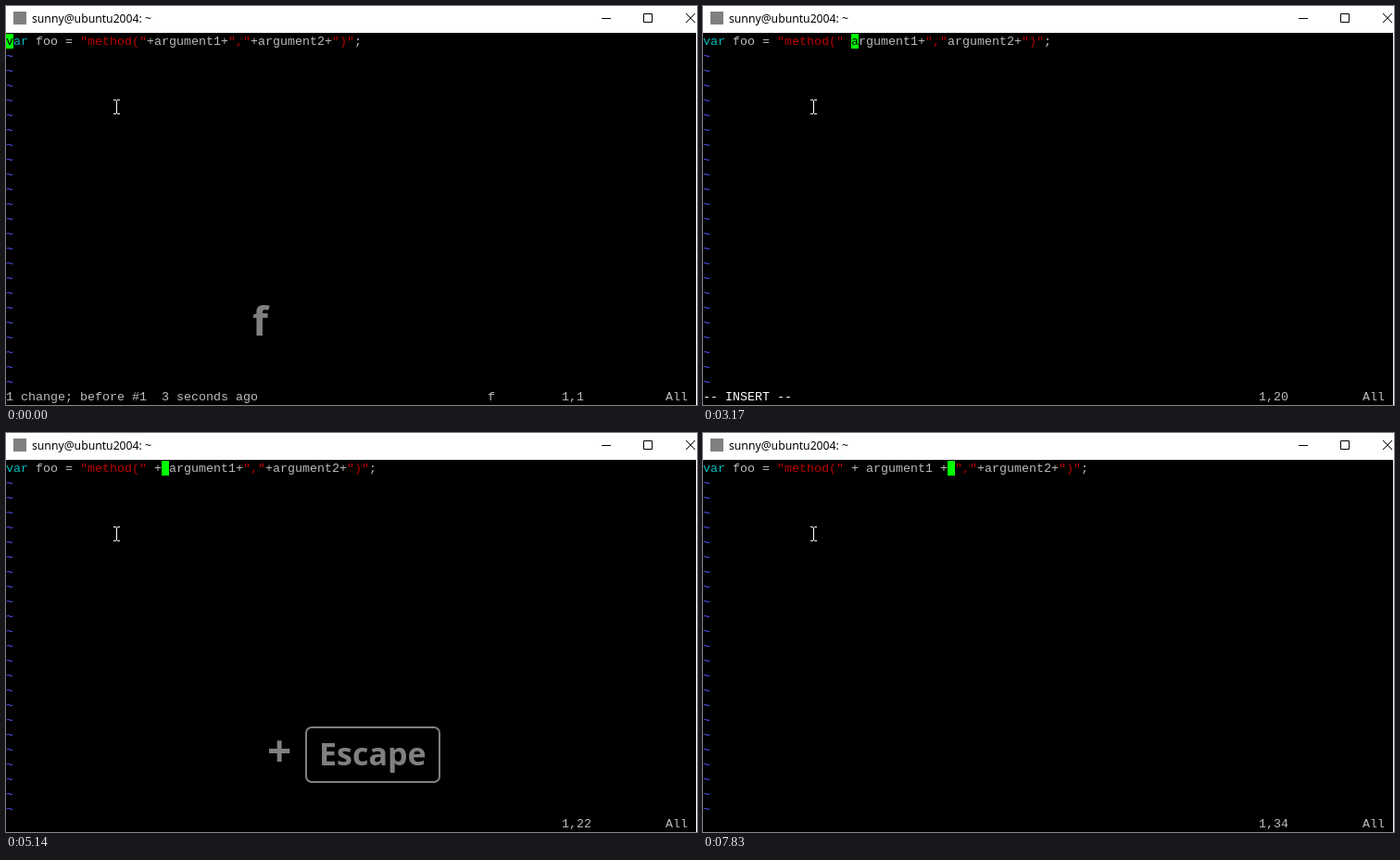
Animation of 746x431 px, one loop 8 s. Source, as an HTML page:

```html
<!DOCTYPE html>
<html lang="en">
<head>
<meta charset="utf-8">
<title>Terminal</title>
<style>
  html, body { margin: 0; width: 100%; height: 100%; overflow: hidden; background: #000; }
  svg { display: block; width: 746px; height: 431px; }
  text { white-space: pre; }
  .mono { font: 13.333px "Liberation Mono", "Courier New", monospace; }
  .title { font: 12.2px "Noto Sans", "Open Sans", sans-serif; }
  .key { font-family: "Open Sans", "Noto Sans", sans-serif; font-weight: 700; fill: #808080; }
</style>
</head>
<body>
<svg viewBox="0 0 746 431">
  <rect width="746" height="431"/>
  <rect width="746" height="29" fill="#fff"/>
  <rect x="745" width="1" height="431" fill="#fff"/>
  <rect x="8" y="6" width="14" height="14" fill="#808080"/>
  <text class="title" x="28" y="18">sunny@ubuntu2004: ~</text>
  <g fill="none" stroke="#000" stroke-linejoin="round">
    <path d="M643 13.5h10M688.5 8.5h9v9h-9z"/>
    <path d="M734 8l10 10M744 8l-10 10"/>
  </g>
  <g id="tildes"></g>
  <g id="screen"></g>
  <path d="M116 101.5h3M120 101.5h3M119.5 102v14M116 116.5h3M120 116.5h3" fill="none" stroke="#fff"/>
  <g id="keys"></g>
</svg>
<script>
const LOOP = 8000, CELL = 8, ROW = 16, TOP = 30;
const $ = id => document.getElementById(id);

function add(parent, tag, attrs, content = "") {
  const el = document.createElementNS("http://www.w3.org/2000/svg", tag);
  for (const name in attrs) el.setAttribute(name, attrs[name]);
  el.textContent = content;
  parent.append(el);
}

const put = (parent, col, row, str, fill = "#bbb") =>
  add(parent, "text", { class: "mono", x: col * CELL, y: TOP + row * ROW + 12, fill }, str);

for (let row = 1; row <= 23; row++) put($("tildes"), 0, row, "~", "#5555ff");

// Pressed keys: [text, x, baseline, size]
const F = ["f", 266, 356, 43.5];
const plus = x => ["+", x, 359.5, 46];
const ESC = ["Escape", 338, 359, 34];
const SEMI = [";", 473, 356, 43];

const code = (before, after = '","+argument2+")";') =>
  `var foo = "method("${before}${after}`;
const INSERT = "-- INSERT --";

// Each step lists only what differs from the step before it.
const steps = [
  [0, { line: code("+argument1+"), col: 0, ruler: "1,1", pending: "f",
        msg: "1 change; before #1  3 seconds ago", keys: [F], alpha: 1 }],
  [250, { alpha: .5 }],
  [370, { alpha: 0 }],
  [520, { col: 19, ruler: "1,20", pending: "", keys: [F, plus(286)], alpha: 1 }],
  [950, { alpha: .5 }],
  [1070, { alpha: 0 }],
  [1940, { line: code("argument1+"), msg: INSERT, keys: [["s", 266, 356, 43]], alpha: 1 }],
  [2470, { alpha: .5 }],
  [2590, { alpha: 0 }],
  [3170, { line: code(" argument1+", '","argument2+")";'), col: 20 }],
  [3290, { line: code(" argument1+"), ruler: "1,21" }],
  [3700, { line: code(" +argument1+"), col: 21, ruler: "1,22", keys: [plus(282)], alpha: 1 }],
  [4100, { line: code(" + argument1+"), col: 22, ruler: "1,23" }],
  [4600, { alpha: .5 }],
  [4720, { alpha: 0 }],
  [4870, { keys: [plus(282), ESC], alpha: 1 }],
  [4990, { msg: "", ruler: "" }],
  [5140, { col: 21, ruler: "1,22" }],
  [5420, { alpha: .5 }],
  [5570, { alpha: 0 }],
  [5850, { col: 31, ruler: "1,32", keys: [plus(282), ESC, SEMI], alpha: 1 }],
  [6410, { alpha: 0 }],
  [7250, { line: code(" + argument1 + "), col: 33, ruler: "1,34", keys: [[".", 265.5, 356, 43]], alpha: 1 }],
  [7680, { alpha: .5 }],
  [7830, { alpha: 0 }]
];

let last = {};
const states = steps.map(([at, change]) => last = { ...last, ...change, at });

const tokenColor = token =>
  token[0] === '"' ? "#bb0000" : token === "var" ? "#00bbbb" : "#bbb";

function drawLine(g, { line, col }) {
  for (const { 0: token, index } of line.matchAll(/"[^"]*"|[^"\s]+/g))
    put(g, index, 0, token, tokenColor(token));
  add(g, "rect", { x: col * CELL, y: TOP, width: CELL, height: ROW, fill: "#0f0" });
  put(g, col, 0, line[col], "#000");
}

function drawStatus(g, { msg, ruler, pending }) {
  put(g, 0, 24, msg, msg === INSERT ? "#fff" : "#bbb");
  put(g, 65, 24, pending);
  put(g, 75, 24, ruler);
  if (ruler) put(g, 89, 24, "All");
}

function drawKeys(g, { keys, alpha }) {
  g.setAttribute("opacity", alpha);
  for (const key of keys) {
    const [str, x, y, size] = key;
    if (key === ESC) add(g, "rect", { x: 324, y: 318, width: 144, height: 59, rx: 6,
      fill: "none", stroke: "#808080", "stroke-width": 2 });
    add(g, "text", { class: "key", x, y, "font-size": size }, str);
  }
}

let shown;
function render(t) {
  const state = states.findLast(s => s.at <= t);
  if (state === shown) return;
  shown = state;
  $("screen").replaceChildren();
  $("keys").replaceChildren();
  drawLine($("screen"), state);
  drawStatus($("screen"), state);
  drawKeys($("keys"), state);
}

const start = performance.now();
function tick() {
  render((performance.now() - start) % LOOP);
  requestAnimationFrame(tick);
}
tick();
</script>
</body>
</html>
```
